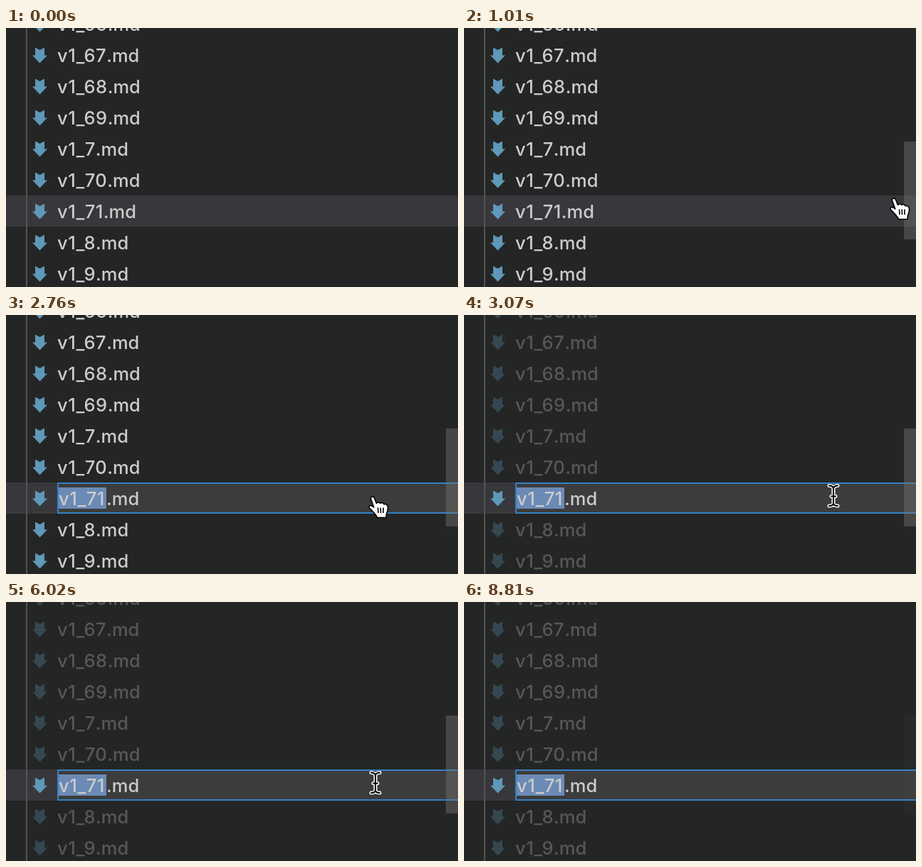
Animation of 635x365 px, one loop 9390 ms. Source, as an HTML page:

```html
<!DOCTYPE html>
<html lang="en">
<head>
<meta charset="utf-8">
<title>Renaming a file</title>
<style>
  html, body { margin: 0; width: 100%; height: 100%; overflow: hidden; background: #242625; }
  svg { display: block; width: 635px; height: 365px; }
  text { font: 500 25.5px Inter, "Liberation Sans", sans-serif; fill: #ccc; }
  .stem { letter-spacing: .5px; }
  .icon { fill: #5f98b8; }
  .sel { fill: #6b8ab5; }

  .others, .label, .edit, .stem-sel, .ext-sel, .hand, .beam {
    animation: 9390ms step-end infinite;
  }
  .others { animation-name: dim; }
  .label { animation-name: label; }
  .edit { animation-name: edit; }
  .stem-sel { animation-name: stem-sel; }
  .ext-sel { animation-name: ext-sel; }
  .hand { animation-name: hand; }
  .beam { animation-name: beam; }
  .bar { animation: bar 9390ms linear infinite; }

  @keyframes dim { 0% { opacity: 1 } 32.69%, 100% { opacity: .3 } }
  @keyframes label { 0% { opacity: 1 } 29.39%, 100% { opacity: 0 } }
  @keyframes edit { 0% { opacity: 0 } 29.39%, 100% { opacity: 1 } }

  /* The selection cycles through stem, whole name and extension. */
  @keyframes stem-sel {
    0%, 64.11%, 91.26%, 100% { opacity: 1 }
    56.22%, 90.41% { opacity: 0 }
  }
  @keyframes ext-sel {
    0%, 64.11%, 91.26%, 100% { opacity: 0 }
    47.6%, 74.65% { opacity: 1 }
  }

  @keyframes bar {
    0%, 2.87% { opacity: 0 }
    4.68%, 88.71% { opacity: 1 }
    93.82%, 100% { opacity: .1 }
  }

  @keyframes hand {
    0% { transform: translate(650px, 340px) }
    2.87% { transform: translate(626px, 328px) }
    3.72% { transform: translate(614px, 310px) }
    4.68% { transform: translate(605px, 294px) }
    5.64% { transform: translate(597px, 280px) }
    7.34% { transform: translate(591px, 262px) }
    8.2% { transform: translate(589px, 238px) }
    9.05% { transform: translate(591px, 216px) }
    9.9% { transform: translate(595px, 210px) }
    10.75% { transform: translate(598px, 238px) }
    23.96% { transform: translate(586px, 238px) }
    25.66% { transform: translate(560px, 241px) }
    26.51% { transform: translate(522px, 250px) }
    27.36% { transform: translate(509px, 254px) }
    32.69%, 100% { transform: translate(650px, 340px) }
  }
  @keyframes beam {
    0%, 88.71%, 100% { transform: translate(680px, 238px) }
    32.69% { transform: translate(519px, 238px) }
    87% { transform: translate(641px, 218px) }
  }
</style>
</head>
<body>
<svg viewBox="0 0 635 365">
  <defs>
    <path id="arrow" d="M41-10.5 47.5-7 54-10.5V.5H58L47.5 11.5 37 .5H41Z"/>
    <path id="caret" d="M-6 2.5C-2.5 2.5 0 4 0 7V27C0 30 -2.5 31 -6 31M6 2.5C2.5 2.5 0 4 0 7M0 27C0 30 2.5 31 6 31M-3 17.5H3"/>
  </defs>

  <rect width="635" height="365" fill="#242625"/>
  <rect y="236" width="635" height="44" fill="#38383c"/>
  <rect x="28" width="2" height="365" fill="#525453"/>

  <g class="others"></g>
  <g class="active"></g>

  <g class="edit">
    <rect x="73" y="237" width="600" height="42" fill="#3c3c3c" stroke="#3580c6" stroke-width="2"/>
    <rect class="sel stem-sel" x="74" y="243" width="67" height="30"/>
    <rect class="sel ext-sel" x="141" y="243" width="46" height="30"/>
    <text y="267.7"><tspan class="stem" x="74">v1_71</tspan><tspan x="141">.md</tspan></text>
  </g>

  <rect class="bar" x="618" y="160" width="17" height="138" fill="#797979" fill-opacity=".4"/>

  <g class="hand">
    <path d="M3.5 5C3 1.5 7.5 .8 8.5 4L11.5 11.5C13 9.5 16 9.5 16.8 11.5 18.5 9.8 21.5 10.5 22 12.8 24.5 11.8 27 13.5 27.3 16 27.8 19.5 27 23 25.5 26L25 31.5H12.5C11.5 28 8 25 5 21.5 3 19 .5 18 1 16 1.8 13.5 5.5 14.5 7.8 17Z"
      fill="#fff" stroke="#000" stroke-width="1.6" stroke-linejoin="round"/>
    <path d="M13.5 17.5 14 25M17.2 17.5 17.5 25M21 17.5V25" stroke="#000" stroke-width="1.6"/>
  </g>

  <g class="beam" fill="none" stroke-linecap="round">
    <use href="#caret" stroke="#fff" stroke-width="5"/>
    <use href="#caret" stroke="#000" stroke-width="2"/>
  </g>
</svg>
<script>
  const versions = [66, 67, 68, 69, 7, 70, 71, 8, 9];

  const row = (version, i) => `
    <g transform="translate(0 ${i * 44 - 6})">
      <use class="icon" href="#arrow"/>
      <text class="${version === 71 ? 'label' : ''}" x="72" y="9.7"><tspan class="stem">v1_${version}</tspan>.md</text>
    </g>`;

  const fill = (selector, keep) => {
    document.querySelector(selector).innerHTML =
      versions.map((v, i) => keep(v) ? row(v, i) : '').join('');
  };

  fill('.others', v => v !== 71);
  fill('.active', v => v === 71);
</script>
</body>
</html>
```
